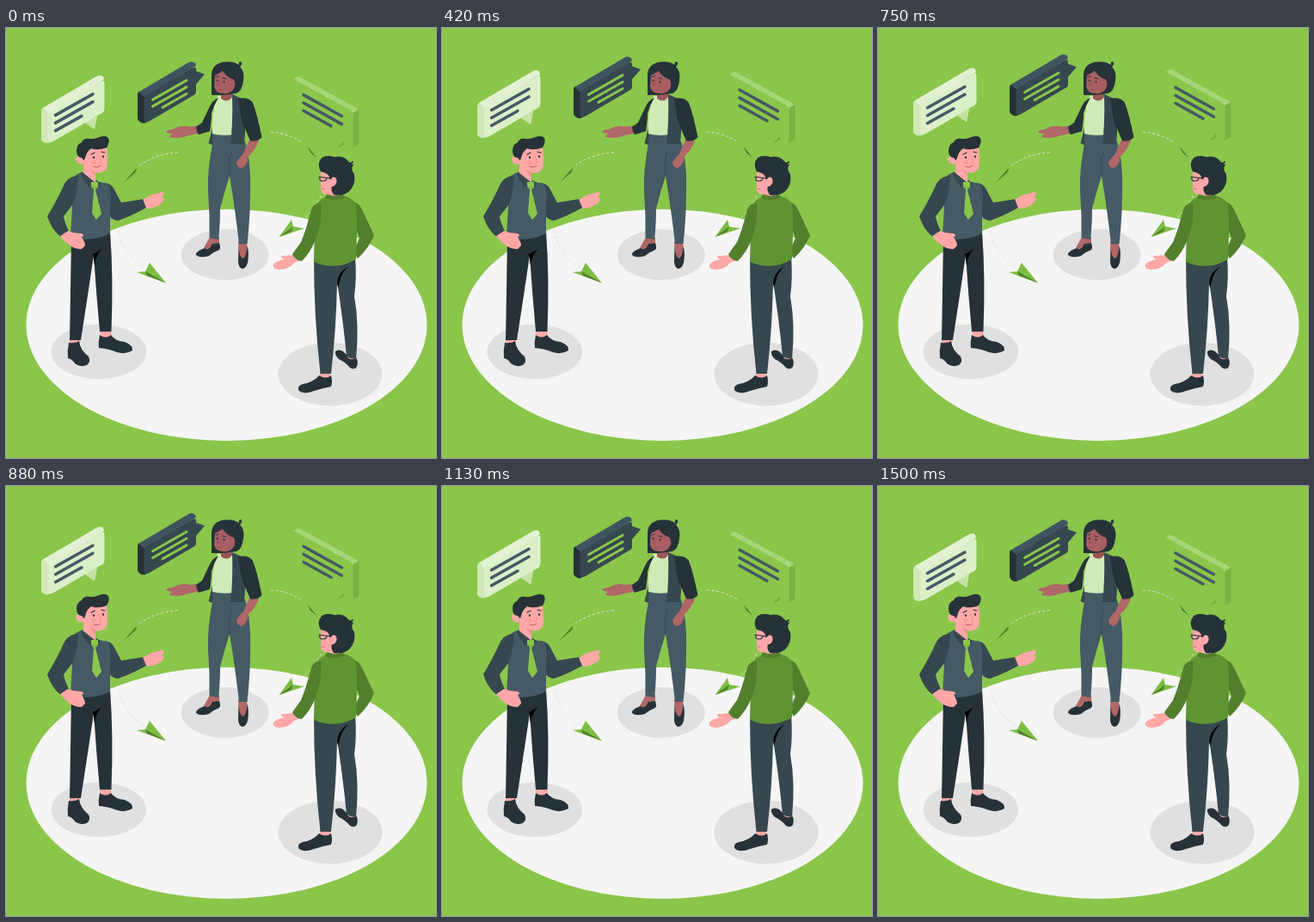
Write an HTML page that moves like this. It is 500 px wide and 500 px high and loops after 1.54 s.

```html
<!DOCTYPE html>
<html lang="en">
<head>
<meta charset="utf-8">
<title>Three people talking</title>
<style>
  html, body { margin: 0; width: 100%; height: 100%; overflow: hidden; background: #8ac64a; }
  svg { display: block; width: 100vw; height: 100vh; }
  .ink { fill: #263238; } .slate { fill: #37474f; } .steel { fill: #455a64; }
  .skin { fill: #ffa8a7; } .brown { fill: #b16668; }
  .blush { fill: #f28f8f; } .leaf { fill: #7cbe42; } .moss { fill: #537f2d; }
  .line { fill: none; stroke-linecap: round; stroke-linejoin: round; }
  .dash { fill: none; stroke: #e0e0e0; stroke-width: 1; stroke-dasharray: 3.2 2.4; }
  .text { fill: none; stroke: #455a64; stroke-width: 3.5; stroke-linecap: round; }
</style>
</head>
<body>
<svg viewBox="0 0 500 500">
  <rect width="500" height="500" fill="#8ac64a"/>
  <ellipse cx="256.5" cy="345.3" rx="233" ry="134.6" fill="#f5f5f5"/>
  <g fill="#e0e0e0">
    <ellipse cx="107.8" cy="376.4" rx="55.3" ry="31.8"/>
    <ellipse cx="254.7" cy="263.5" rx="51" ry="29.4"/>
    <ellipse cx="377" cy="402.6" rx="60.5" ry="36.8"/>
  </g>

  <!-- speech bubbles -->
  <g class="bubble">
    <path fill="#d0e8b5" d="M41 97Q41 94 44 92L50 98V134H47Q41 133 41 129Z"/>
    <path fill="#e3f1d3" d="M43 93L106 56Q110 54.500 113 56.500L114 60L51 101Q47 98 43 93Z"/>
    <path fill="#dcefc9" d="M49 104Q49 100 52 98L111 62Q114.500 60 114.500 64V94Q114.500 97 112 99L106 102L103 118L92 110.500L55 132Q49 135 49 130Z"/>
    <path fill="#c6e2a5" d="M92 110.500L106 102L103 118Z"/>
    <path class="text" d="M57.500 101.500L101 77M57.500 110.500L101 86M57.500 119.500L88 102.500"/>
  </g>
  <g class="bubble">
    <path class="slate" d="M217 49L231 54L219 68Z"/>
    <path class="ink" d="M153 77Q153 75 155 74L162 79V111H159Q153 109 153 105Z"/>
    <path fill="#405460" d="M154.500 74.500L212 40.500Q216 38 220 41L221 44L162 81Q158 78 154.500 74.500Z"/>
    <path class="slate" d="M160.500 83Q160.500 80 163 78.500L217 46.500Q221 44.500 221 48V74Q221 77 218 78.500L166 109Q160.500 112 160.500 107Z"/>
    <path class="text" style="stroke:#8ac64a;stroke-width:3" d="M170.500 83.500L210 61M170.500 91.300L210 68.800M182 92.500L210 76.600"/>
  </g>
  <g class="bubble">
    <path fill="#a7d677" d="M335 60Q337 57 341 57L407 93Q410 95 410 97L403.500 100Q402 97 399 95Z"/>
    <path fill="#7ab340" d="M403.500 98.500L410.500 95V134Q410 137 403 139.500Q403.500 138 403.500 135Z"/>
    <path fill="#75ad3d" d="M385 140L392.500 132L393.500 136Z"/>
    <path class="text" d="M346 78L390.500 102.700M346 87.200L390.500 112M346 96.300L378 114"/>
  </g>

  <!-- flight paths and paper planes -->
  <path class="dash" d="M155 160Q174 146 202 144.500M131 236Q137 267 164 280M308 121Q327 122 343 132M348 220Q360 210 367 193"/>
  <path class="moss" d="M136.500 180L152 162.500L151 167.500ZM350 137L362 151.500L354 145Z"/>
  <path class="leaf" d="M186 296.500L152 284L162 283L167 273Z"/>
  <path class="moss" d="M186 296.500L162 283L164 288Z"/>
  <path class="leaf" d="M317.500 243L332 223L334 231L347 233Z"/>
  <path class="moss" d="M317.500 243L334 231L331.500 237Z"/>

  <!-- woman -->
  <g>
    <path class="brown" d="M237 243H248L248 254L236 262L226 263ZM270 248H280L281 264L276 275L271 268Z"/>
    <path class="ink" d="M221 262Q224 258 231 256Q236 260 240 251L248 250Q250 255 248 258Q242 260 236 265Q225 268 221 264Z"/>
    <path class="ink" d="M270.500 254Q271 267 276 268Q280 265 280.500 253Q283 262 281 273Q279 280 274.500 280Q270 278 270 271Z"/>
    <path class="slate" d="M242 108L235.500 134L242 137Z"/>
    <path class="steel" d="M241 121L263 120L278 132Q285 155 284 190Q284 220 280.500 251H271Q267 215 260 172Q254 190 249 210Q249 230 247 246L236.500 244Q237 216 235 190Q234 164 240 135Z"/>
    <path class="line" stroke="#37474f" stroke-width="1" d="M260 172Q258 155 262 144"/>
    <path class="brown" d="M225 113Q216 116 208 114Q200 114 194 118Q187 118 186 121Q190 123 194 123Q188 125 191 127Q203 129 212 125L227 122Z"/>
    <path fill="#d1e9b7" d="M246 79L265 77L265 124Q250 126 240 123Q238 100 246 79Z"/>
    <path fill="#9a5657" d="M250 68H264L263 80Q258 88 250 82Z"/>
    <path class="ink" d="M247 81Q240 84 236 93L228 110L221 115Q221 120 224 124L237 120Q239 106 239 99Q242 89 247 81Z"/>
    <path class="slate" d="M263 77L274 82L280 96L277 135L261 135Q264 112 263 77Z"/>
    <path class="brown" d="M283 130L294 131Q290 142 282 149Q280 162 273 163Q268 161 268 156Q272 150 276 146Z"/>
    <path class="ink" d="M270 82Q282 80 287 87Q292 100 297.500 127Q292 133 284 131Q279 120 274 108Z"/>
    <path class="ink" d="M239 78V55Q239 42 253 39.500Q265 38 271 43Q270 39 273 39Q276 41 272 45Q278 51 276 61Q275 73 268 76L252 78Z"/>
    <path fill="#a85f61" d="M243 55Q249 52 252 50Q256 57 265 60Q268 67 264 72Q260 77 252 76Q244 76 242 68Z"/>
    <g class="line" stroke="#263238" stroke-width="1">
      <path d="M244 57L247 56M252 58L256 59"/>
      <path stroke-width="1.700" d="M245.500 60.500V61.500M253.500 62V63"/>
    </g>
    <path class="line" stroke="#854a4d" stroke-width=".8" d="M248 61L246 66L248 67M247 71L251 72"/>
  </g>

  <!-- man with tie -->
  <g>
    <path class="skin" d="M74 360H86L85 371H74ZM109 350H122L123 362H110Z"/>
    <path class="ink" d="M73 366Q80 367 85 364Q86 374 96 382Q99 388 94 392Q86 395 80 390Q77 385 72 384Q71 375 73 366Z"/>
    <path class="ink" d="M109 357Q116 362 122 357Q127 364 138 365Q148 369 147 375Q139 380 129 377Q120 373 108 372Q107 365 109 357Z"/>
    <path class="ink" d="M76 240L121 236Q125 290 122.500 353H109Q105 310 102 264Q96 305 87 363H74Q75 310 76 240Z"/>
    <path d="M101 263L112 257Q105 262 103 276Z"/>
    <path class="skin" d="M159 200Q168 193 177 192Q184 189 184 193Q179 198 184 198Q183 204 176 207Q169 211 161 209Z"/>
    <path class="slate" d="M115 180Q123 181 126 188L134 203L159 199L163 209Q145 219 130 224Q122 224 116 212Z"/>
    <path class="steel" d="M87 168Q79 171 75 178Q73 196 77 207L75 243Q99 250 121 239L121 207Q124 190 118 181L104 178Z"/>
    <path class="slate" d="M84 172Q73 172 68 181Q60 199 48 219Q53 235 64 243Q70 242 73 236Q68 226 67 219L78 205Q83 190 84 172Z"/>
    <path class="skin" d="M63 242L72 236Q80 239 88 239Q92 241 88 243Q92 249 92 253L88 257Q79 257 73 252Q68 248 63 242Z"/>
    <path class="line" stroke="#f28f8f" stroke-width=".7" d="M80 247L87 250M79 250L85 254"/>
    <path class="skin" d="M91 143Q105 134 117 140Q119 154 117 163Q114 170 104 168L104 180Q96 179 90 170V158Q82 160 81 152Q83 147 88 150Z"/>
    <path class="blush" d="M97 164L104 168V172Q100 169 97 164Z"/>
    <path class="slate" d="M88 167L103 179L97 185Q90 178 87 170ZM104 176L109 180L110 186Z"/>
    <path fill="#8ac64a" d="M99 179L107 179L107 185L104 188L111 216L105 223L100 215L102 188L99 184Z"/>
    <path class="leaf" d="M100 184L107 184L104 188Z"/>
    <path class="ink" d="M88 151Q82 150 82 143Q82 135 88 133Q90 127 99 129Q104 129 108 127Q116 124 119 128Q121 133 117 139Q107 143 99 140Q94 144 93 148L91 154Z"/>
    <g class="line" stroke="#263238" stroke-width="1.200">
      <path d="M99 147L103 145M111 144L115 145"/>
      <path stroke-width="1.900" d="M102 150V151M113 149V150"/>
      <path stroke-width="1" d="M102 161Q107 163 110 160" stroke="#b75c60"/>
      <path stroke-width=".8" d="M108 149L111 156L108 157" stroke="#ed8586"/>
    </g>
    <circle class="blush" cx="102" cy="156" r="2.500" opacity=".5"/>
  </g>

  <!-- man with glasses -->
  <g>
    <path class="skin" d="M365 399H377V409H365ZM396 380H407V390H399Z"/>
    <path class="ink" d="M340 418Q341 414 350 413Q359 410 364 404Q372 409 378 404Q380 411 378 417Q367 419 358 422Q346 427 340 421Z"/>
    <path class="ink" d="M383 376Q387 373 392 376Q396 379 398 384Q404 387 407 383Q410 388 408 394Q405 398 400 395Q394 388 387 385Q382 380 383 376Z"/>
    <path class="slate" d="M358 268L406 266Q408 290 405 312Q411 345 407 385Q401 385 396 382Q392 340 385 295Q384 350 378 402H365.500Q358 335 358 268Z"/>
    <path d="M385 297Q386 284 398 277Q390 285 388 295L386 302Z"/>
    <path class="skin" d="M334 264Q326 265 320 265Q319 268 324 269Q313 271 311 275Q309 280 317 281Q329 281 335 273L343 270Z"/>
    <path class="moss" d="M402 201Q410 203 414 211L428 241Q422 256 409 268L404 260L411 244L403 224Z"/>
    <path fill="#5f9432" d="M371 197Q382 202 393 195Q402 197 407 205Q409 225 407 269Q384 283 358 272L359 230Q358 207 364 201Z"/>
    <path class="moss" d="M366 204Q358 203 355 211Q349 235 343 249L333 263Q336 270 344 271Q354 261 360 246Q368 225 366 204Z"/>
    <path class="skin" d="M366 168Q372 162 387 169L389 192Q384 200 374 197L375 193Q367 195 366 187Z"/>
    <path class="moss" d="M371 198Q372 192 376 194Q385 197 391 193L394 197Q384 203 371 198Z"/>
    <path class="ink" d="M366 167Q361 158 367 151Q373 147 382 150Q392 148 398 155Q402 158 404 159Q400 164 405 170Q407 182 399 190Q391 196 381 194Q377 188 379 184L376 174Q376 169 366 167Z"/>
    <path class="skin" d="M377 176Q381 171 384 175Q386 181 381 184Q377 185 376 180Z"/>
    <g class="line" stroke="#263238" stroke-width="1.200">
      <path d="M378 175L364 173M365 173Q364 178 368 178Q373 178 373 174"/>
      <path d="M400 158L403 156" stroke-width="2"/>
    </g>
    <path class="line" stroke="#b75c60" stroke-width=".8" d="M367 187L370 187"/>
  </g>
</svg>
<script>
  const LOOP = 1540, LOWEST = 1480, TRAVEL = 8.8;
  const bubbles = document.querySelectorAll('.bubble');
  const start = performance.now();

  function draw(now) {
    const t = Math.max(0, now - start) % LOOP;
    const lift = TRAVEL * (1 - Math.cos(2 * Math.PI * (t - LOWEST) / LOOP)) / 2;
    for (const b of bubbles) b.setAttribute('transform', `translate(0 ${-lift})`);
    requestAnimationFrame(draw);
  }
  draw(start);
</script>
</body>
</html>
```
